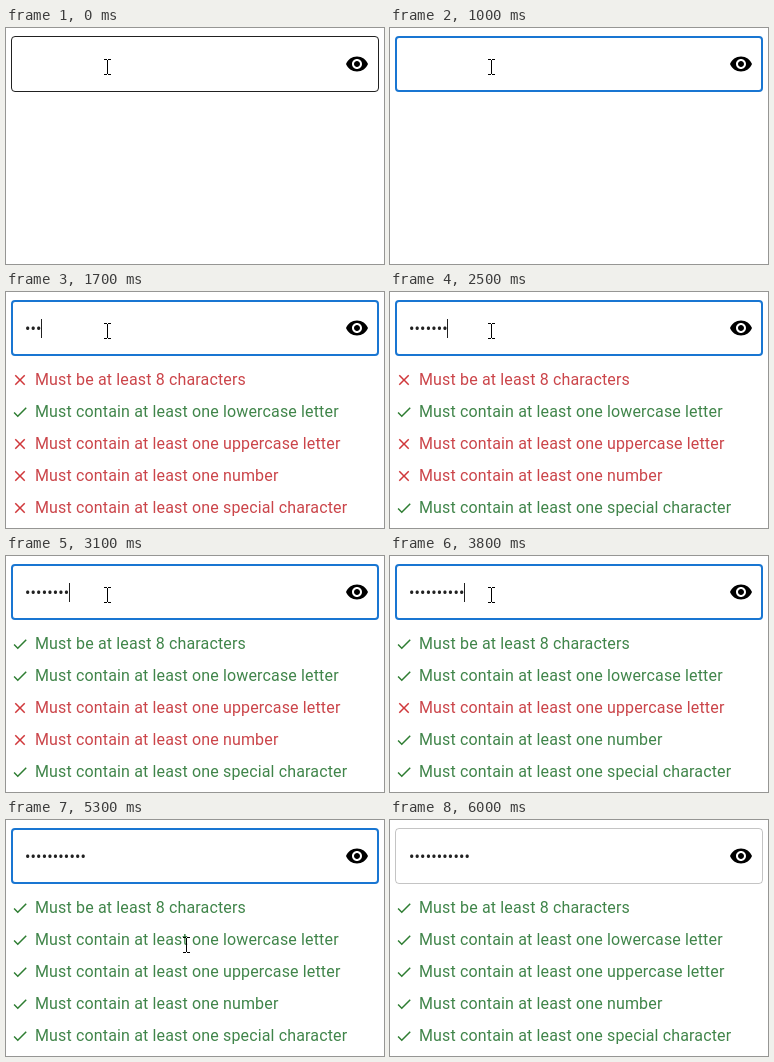
Recreate the animation shown at these times as an HTML page with a canvas. Size 378 by 236 pixels, loop 6.1 s.

```html
<!DOCTYPE html>
<html lang="en">
<head>
<meta charset="utf-8">
<title>Password rules</title>
<style>
  html, body { margin: 0; width: 100%; height: 100%; overflow: hidden; background: #fff; }
  canvas { display: block; width: 378px; height: 236px; }
</style>
</head>
<body>
<canvas id="stage"></canvas>
<script>
const W = 378, H = 236, LOOP = 6100, TICK = 100;
const FOCUS = 400, BLUR = 6000, BLINK = 560;
const BLUE = '#1976d2', INK = 'rgba(0,0,0,0.87)';
const FONT = '16px Roboto, sans-serif';
const MET = { icon: '#2e7d32', text: '#40854a' };
const UNMET = { icon: '#d0383b', text: '#cb454a' };

// Moments at which one more character is typed
const keyTimes = [1200, 1400, 1600, 1800, 2100, 2300, 2500, 3100, 3500, 3800, 4200];

// Each rule is met once this many characters are in
const rules = [
  ['Must be at least 8 characters', 8],
  ['Must contain at least one lowercase letter', 1],
  ['Must contain at least one uppercase letter', 11],
  ['Must contain at least one number', 10],
  ['Must contain at least one special character', 7]
];

// Pointer path: time, x, y
const pointerPath = [
  [0, 101, 39], [4900, 101, 39], [5000, 118, 58], [5100, 150, 92],
  [5200, 150, 92], [5300, 180, 125], [5900, 205, 246]
];

const eye = new Path2D('M12 4.5C7 4.5 2.73 7.61 1 12c1.73 4.39 6 7.5 11 7.5s9.27-3.11 11-7.5c-1.73-4.39-6-7.5-11-7.5z' +
  'M12 17c-2.76 0-5-2.24-5-5s2.24-5 5-5 5 2.24 5 5-2.24 5-5 5z' +
  'm0-8c-1.66 0-3 1.34-3 3s1.34 3 3 3 3-1.34 3-3-1.34-3-3-3z');
const check = new Path2D('M9 16.17 4.83 12l-1.42 1.41L9 19 21 7l-1.41-1.41z');
const cross = new Path2D('M19 6.41 17.59 5 12 10.59 6.41 5 5 6.41 10.59 12 5 17.59 6.41 19 12 13.41 17.59 19 19 17.59 13.41 12z');

const canvas = document.getElementById('stage');
const ctx = canvas.getContext('2d');
const dpr = window.devicePixelRatio || 1;
canvas.width = Math.round(W * dpr);
canvas.height = Math.round(H * dpr);

function icon(path, x, y, size, color) {
  ctx.save();
  ctx.translate(x, y);
  ctx.scale(size / 24, size / 24);
  ctx.fillStyle = color;
  ctx.fill(path, 'evenodd');
  ctx.restore();
}

function text(str, x, y, color) {
  ctx.fillStyle = color;
  ctx.fillText(str, x, y);
}

function drawField(focused, hovered) {
  const line = focused ? 2 : 1;
  ctx.lineWidth = line;
  ctx.strokeStyle = focused ? BLUE : hovered ? INK : 'rgba(0,0,0,0.23)';
  ctx.beginPath();
  ctx.roundRect(5 + line / 2, 8 + line / 2, 368 - line, 56 - line, 4 - line / 2);
  ctx.stroke();
  icon(eye, 339, 24, 24, '#000');
}

// The blink restarts on focus and on every key
function caretOn(t, count) {
  const since = t - (count ? keyTimes[count - 1] : FOCUS);
  return t >= FOCUS && t < BLUR && Math.floor(since / BLINK) % 2 === 0;
}

function drawPassword(t, count) {
  const dots = '\u2022'.repeat(count);
  text(dots, 19, 42, INK);
  if (caretOn(t, count)) {
    ctx.fillStyle = INK;
    ctx.fillRect(Math.floor(19 + ctx.measureText(dots).width), 27, 1, 19);
  }
}

function drawRules(count) {
  rules.forEach(([label, needed], i) => {
    const ok = count >= needed, color = ok ? MET : UNMET, y = 93 + 32 * i;
    icon(ok ? check : cross, 5, y - 14, 18, color.icon);
    text(label, 29, y, color.text);
  });
}

function drawPointer(t) {
  const next = pointerPath.findIndex(p => p[0] > t);
  if (next < 0) return;
  const [t0, x0, y0] = pointerPath[next - 1], [t1, x1, y1] = pointerPath[next];
  const k = (t - t0) / (t1 - t0);
  const x = Math.round(x0 + (x1 - x0) * k), y = Math.round(y0 + (y1 - y0) * k);
  ctx.fillStyle = '#000';
  ctx.fillRect(x, y - 7, 1, 14);
  for (const edge of [y - 8, y + 7]) {
    ctx.fillRect(x - 3, edge, 3, 1);
    ctx.fillRect(x + 1, edge, 3, 1);
  }
}

function draw(now) {
  const t = Math.floor((now % LOOP) / TICK) * TICK;
  const count = keyTimes.filter(k => k <= t).length;
  ctx.setTransform(dpr, 0, 0, dpr, 0, 0);
  ctx.fillStyle = '#fff';
  ctx.fillRect(0, 0, W, H);
  ctx.font = FONT;
  ctx.letterSpacing = '0.15px';
  drawField(t >= FOCUS && t < BLUR, t < FOCUS);
  drawPassword(t, count);
  if (count) drawRules(count);
  drawPointer(t);
}

const start = performance.now();
function loop() {
  draw(performance.now() - start);
  requestAnimationFrame(loop);
}
loop();
</script>
</body>
</html>
```
